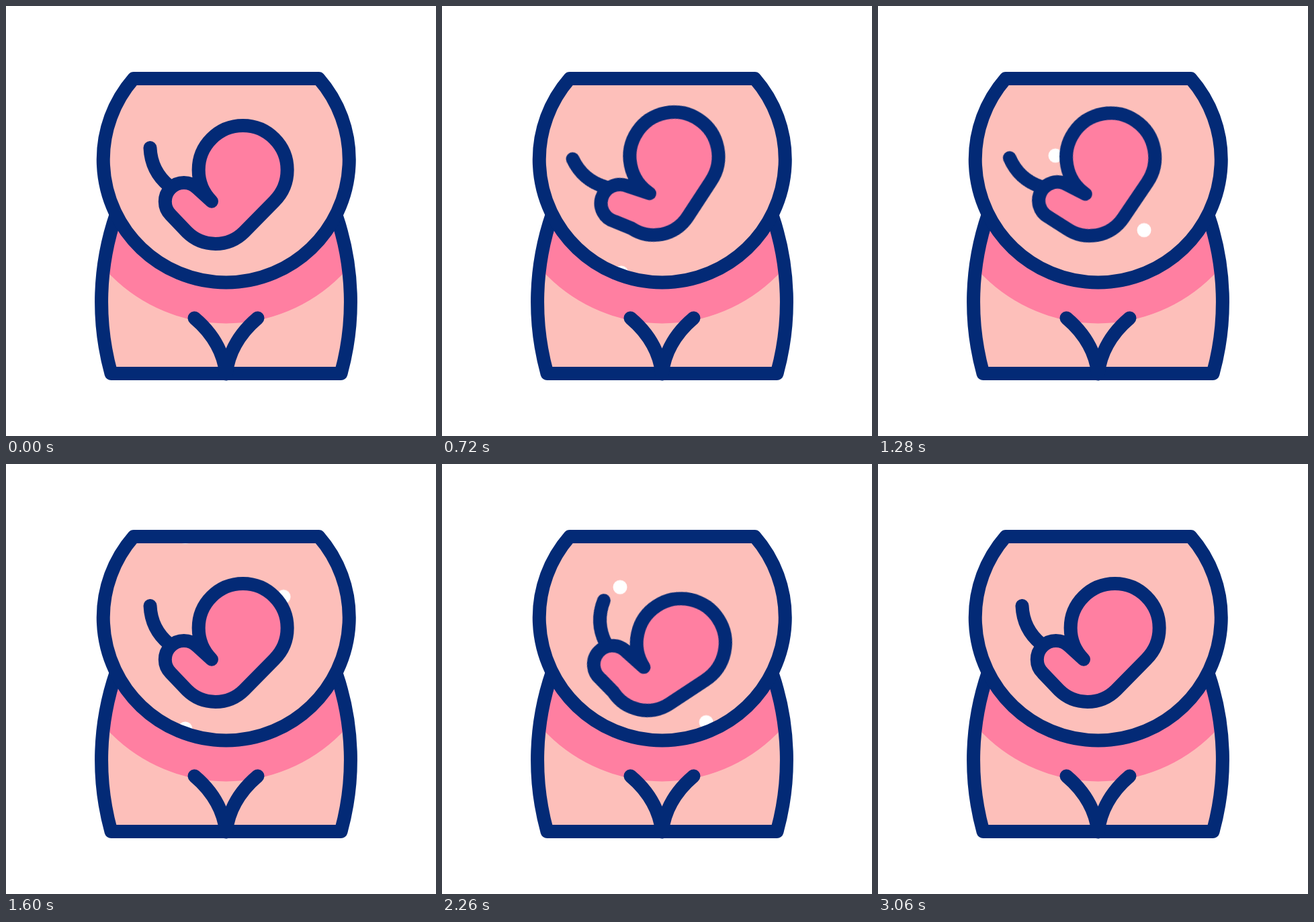
An HTML page that plays this animation: 640x640 px, repeating every 3600 ms.

```html
<!DOCTYPE html>
<html lang="en">
<head>
<meta charset="utf-8">
<title>Baby in belly</title>
<style>
  html, body { margin: 0; width: 100%; height: 100%; overflow: hidden; background: #fff; }
  svg { display: block; width: 100vw; height: 100vh; }

  .skin { fill: #fdbfba; }
  .pink { fill: #ff7fa1; }
  .line { stroke: #032a76; stroke-width: 20; stroke-linecap: round; stroke-linejoin: round; }
  .open { fill: none; }
  .bubble { fill: #fff; }

  .sway, .cord, .baby, .bubble { animation: 3.6s linear infinite both; }
  .sway, .cord { animation-name: sway; }
  .sway { transform-origin: 248px 270px; }
  .cord { transform-origin: 244px 268px; }
  .baby { animation-name: kick; }
  .left { animation-name: rise-left; }
  .right { animation-name: rise-right; }

  @keyframes sway {
    0%, 44.444%, 76.667%, 100% { transform: rotate(0deg); }
    30% { transform: rotate(-17deg); }
    60% { transform: rotate(14.5deg); }
    0%, 30%, 44.444%, 60% { animation-timing-function: cubic-bezier(.36, 0, .64, 1); }
  }

  /* The leg swings out while hip and knee stay on the body.
     Its small arc radius always grows to a half circle. */
  @keyframes kick {
    0%, 41.667%, 44.444%, 85%, 100% {
      d: path("M306 290.7 A66 66 0 1 1 399.3 290.7 L354.3 336.4 A60.4 60.4 0 0 1 269.3 336.4 L245 310.8 A20 20 0 0 1 284.6 271.2 Z");
    }
    20%, 23.333%, 58.889%, 66.667% {
      d: path("M306 290.7 A66 66 0 1 1 399.3 290.7 L354.3 336.4 A60.4 60.4 0 0 1 269.3 336.4 L246.4 321.2 A20 20 0 0 1 272.8 271.8 Z");
    }
    0%, 23.333%, 44.444%, 66.667% { animation-timing-function: cubic-bezier(.36, 0, .64, 1); }
  }

  @keyframes rise-left {
    0%, 18.611% { transform: translate(267px, 413px); }
    35.556% { transform: translate(264px, 223px); }
    44.722%, 100% { transform: translate(267px, 105px); }
  }

  @keyframes rise-right {
    0%, 30.833% { transform: translate(392px, 406px); }
    35.556% { transform: translate(396px, 334px); }
    44.444% { transform: translate(413px, 198px); }
    50.556%, 100% { transform: translate(424px, 104px); }
  }
</style>
</head>
<body>
<svg viewBox="0 0 640 640">
  <defs>
    <path id="belly" d="M190 108 H465.5 A183 183 0 1 1 190 108 Z"/>
    <path id="hips" d="M164 310 A400 400 0 0 0 156.5 547 H498.5 A400 400 0 0 0 491 310 Z"/>
    <clipPath id="in-belly"><use href="#belly"/></clipPath>
    <clipPath id="in-hips"><use href="#hips"/></clipPath>
  </defs>

  <use href="#hips" class="skin"/>
  <circle class="pink" cx="327.5" cy="231" r="241.5" clip-path="url(#in-hips)"/>
  <use href="#hips" class="line open"/>
  <path class="line open" d="M280.5 464.5 Q321.5 499 327.5 547.5 Q333.5 499 374.5 464.5"/>

  <use href="#belly" class="skin"/>
  <g clip-path="url(#in-belly)">
    <circle class="bubble left" r="10.5"/>
    <circle class="bubble left" r="10.5" style="animation-delay: .87s"/>
    <circle class="bubble right" r="10.5" style="animation-delay: -1.1s"/>
    <circle class="bubble right" r="10.5"/>
    <circle class="bubble right" r="10.5" style="animation-delay: 1.1s"/>
  </g>

  <g class="sway">
    <path class="line open cord" d="M214.5 211 Q216 246 243 268"/>
    <path class="line pink baby" d="M306 290.7 A66 66 0 1 1 399.3 290.7 L354.3 336.4 A60.4 60.4 0 0 1 269.3 336.4 L245 310.8 A20 20 0 0 1 284.6 271.2 Z"/>
  </g>
  <use href="#belly" class="line open"/>
</svg>
</body>
</html>
```
